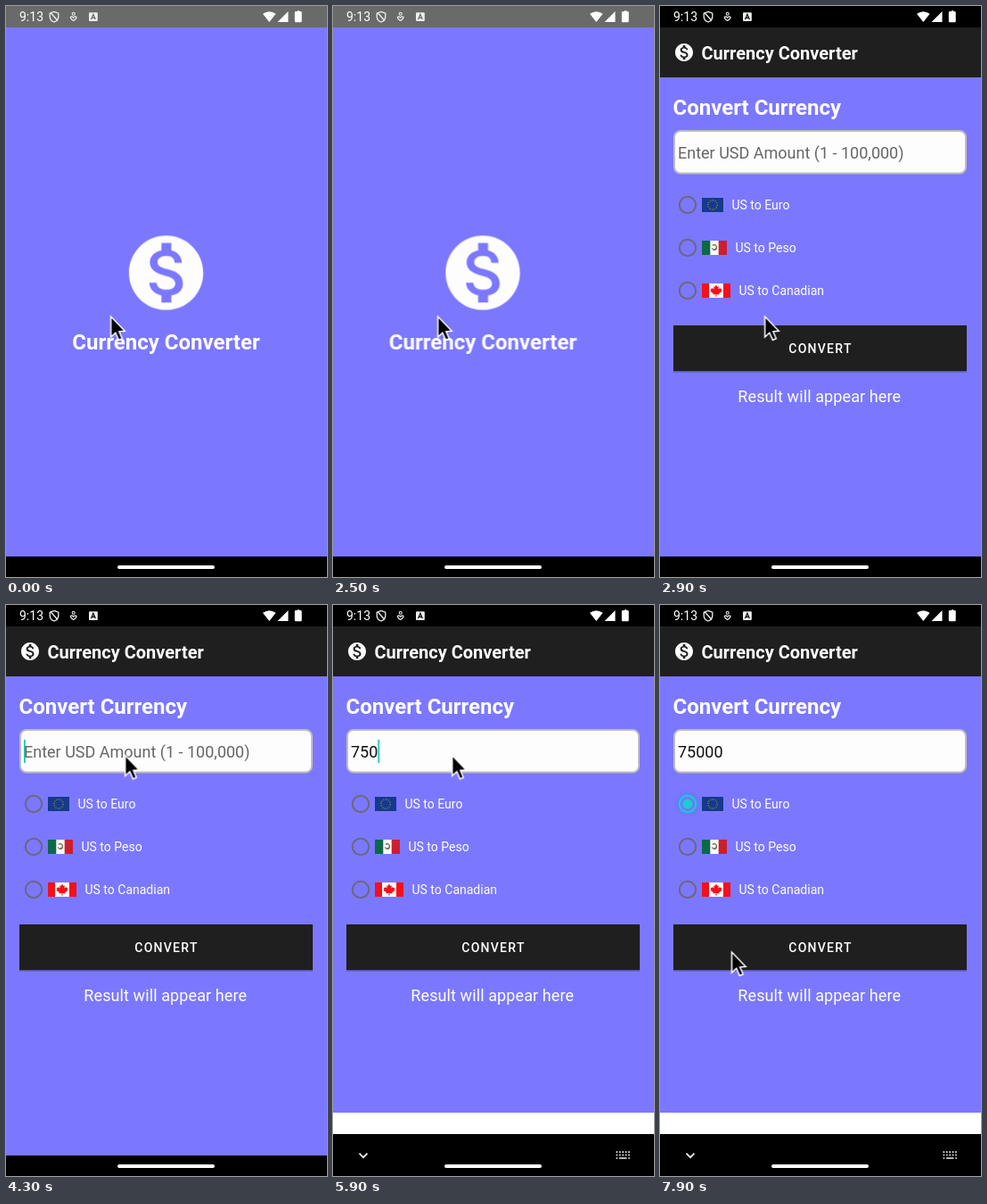
An HTML page for the animation above (8000 ms loop, 360x640 px).

```html
<!DOCTYPE html>
<html lang="en">
<head>
<meta charset="utf-8">
<title>Currency Converter</title>
<style>
html, body { margin: 0; width: 100%; height: 100%; overflow: hidden; background: #000; }
svg { display: block; width: 360px; height: 640px; }
text { font-family: Roboto, Arial, sans-serif; fill: #fff; }
.bold { font-weight: 700; }
.label { font-size: 14px; }
.field { font-size: 18px; }
.bg { fill: #7b78ff; }
.dark { fill: #1f1f1f; }
.ring { fill: none; stroke: #69697a; stroke-width: 2; }
.teal { fill: none; stroke: #1ccbd4; stroke-width: 2; }

/* Every part shares one clock; the picture is updated in 100 ms steps. */
.a { animation: 8s step-end -20ms infinite; }
#splash { animation-name: splash; }
#splashBody { animation-name: splashBody; }
#main { animation-name: main; }
#ime { animation-name: ime; }
#imeBar { animation-name: imeBar; }
#hint { animation-name: hint; }
#typing { animation-name: typing; }
#caret { animation-name: caret; }
#idle { animation-name: idle; }
#pressed { animation-name: pressed; }
#checked { animation-name: checked; }
#pointer { animation-name: pointer; }

@keyframes splash { 0% { opacity: 1 } 32.5%, 100% { opacity: 0 } }
@keyframes splashBody { 0% { transform: none } 31.25%, 100% { transform: translateX(-11.5px) } }
@keyframes main {
  0% { opacity: 0; transform: translateX(12px) }
  32.5% { opacity: 1; transform: translateX(3px) }
  33.75% { opacity: 1; transform: translateX(1px) }
  35%, 100% { opacity: 1; transform: none }
}
@keyframes ime { 0% { opacity: 0 } 55%, 100% { opacity: 1 } }
@keyframes imeBar {
  0% { transform: translateY(47px) }
  56.25% { transform: translateY(15px) }
  57.5% { transform: translateY(4px) }
  58.75%, 100% { transform: none }
}
@keyframes hint { 0% { opacity: 1 } 66.25%, 100% { opacity: 0 } }
@keyframes typing {
  0% { transform: none }
  66.25% { transform: translateX(10.1px) }
  68.75% { transform: translateX(20.2px) }
  73.75% { transform: translateX(30.3px) }
  76.25% { transform: translateX(40.4px) }
  77.5%, 100% { transform: translateX(50.5px) }
}
@keyframes caret {
  0%, 60%, 83.75%, 96.25%, 100% { opacity: 0 }
  53.75%, 66.25%, 90% { opacity: 1 }
}
@keyframes idle { 0% { opacity: 1 } 90%, 100% { opacity: 0 } }
@keyframes pressed { 0% { opacity: 0 } 90% { opacity: 1 } 91.25%, 100% { opacity: 0 } }
@keyframes checked { 0% { opacity: 0 } 91.25%, 100% { opacity: 1 } }
@keyframes pointer {
  0% { transform: translate(117.6px, 348px) }
  42.5% { transform: translate(118px, 343px) }
  43.75% { transform: translate(119px, 327px) }
  45% { transform: translate(122px, 298px) }
  46.25% { transform: translate(125px, 262px) }
  47.5% { transform: translate(128px, 228px) }
  48.75% { transform: translate(131px, 201px) }
  50% { transform: translate(132px, 183px) }
  51.25% { transform: translate(133px, 172px) }
  52.5% { transform: translate(133.6px, 168.5px) }
  82.5% { transform: translate(129px, 171px) }
  83.75% { transform: translate(115px, 179px) }
  85% { transform: translate(91px, 192px) }
  86.25% { transform: translate(67px, 205px) }
  87.5% { transform: translate(50px, 214px) }
  88.75% { transform: translate(41px, 219px) }
  90% { transform: translate(38.5px, 221px) }
  93.75% { transform: translate(42px, 234px) }
  95% { transform: translate(53px, 280px) }
  96.25% { transform: translate(68px, 339px) }
  97.5% { transform: translate(78px, 377px) }
  98.75%, 100% { transform: translate(80.5px, 389px) }
}
</style>
</head>
<body>
<svg viewBox="0 0 360 640">
  <defs>
    <path id="coin" fill="#fdfdfd" d="M12 2C6.48 2 2 6.48 2 12s4.48 10 10 10 10-4.48 10-10S17.52 2 12 2zm1.41 16.09V20h-2.67v-1.93c-1.71-.36-3.16-1.46-3.27-3.4h1.96c.1 1.05.82 1.87 2.65 1.87 1.96 0 2.4-.98 2.4-1.59 0-.83-.44-1.61-2.67-2.14-2.48-.6-4.18-1.62-4.18-3.67 0-1.72 1.39-2.84 3.11-3.21V4h2.67v1.95c1.86.45 2.79 1.86 2.85 3.39H14.3c-.05-1.11-.64-1.87-2.22-1.87-1.5 0-2.4.68-2.4 1.64 0 .84.65 1.39 2.67 1.91s4.18 1.39 4.18 3.91c-.02 1.83-1.38 2.83-3.12 3.16z"/>
    <g id="status">
      <text class="label" x="15" y="17">9:13</text>
      <g fill="none" stroke="#eee" stroke-width="1.3">
        <path d="M54 6.4l4.8 1.8v3.6c0 3-2 5.2-4.8 6.2-2.800-1-4.800-3.200-4.800-6.200V8.200zM50 7.500l8 9"/>
        <g stroke-width="1.100">
          <circle cx="75.700" cy="8.700" r="1.500"/>
          <path d="M72.300 12.200q1.900-1 3.400 .9 1.500-1.900 3.400-.9-.2 2.600-3.400 4.300-3.200-1.700-3.400-4.300z"/>
        </g>
      </g>
      <rect x="93" y="7.300" width="9.800" height="9.800" rx="1" fill="#eee"/>
      <path d="M95.500 15l2.400-5.700 2.400 5.700M96.400 13.300h3" fill="none" stroke="var(--bar)" stroke-width="1.200"/>
      <g fill="#fff">
        <path d="M295.300 18L288 8.700q7.300-5 14.600 0z"/>
        <path d="M316.500 6v12h-12z"/>
        <path d="M326 6h1V5h2v1h1.500q1.200 0 1.200 1.200v9.800q0 1.200-1.200 1.200H325q-1.200 0-1.200-1.200V7.200Q323.800 6 325 6z"/>
      </g>
    </g>
  </defs>

  <g id="main" class="a">
    <rect x="-40" width="440" height="24"/>
    <rect class="bg" x="-40" y="80" width="440" height="537"/>
    <rect class="dark" x="-40" y="24" width="440" height="56"/>
    <use href="#coin" x="15" y="40"/>
    <text class="bold" x="46.500" y="60" font-size="20">Currency Converter</text>
    <text class="bold" x="14.500" y="122" font-size="24">Convert Currency</text>

    <rect x="16" y="140" width="327" height="47.500" rx="7" fill="#fdfdfd" stroke="#bcbcc0" stroke-width="2"/>
    <text class="field" x="20" y="171" style="fill:#111">75000</text>
    <g id="typing" class="a">
      <rect x="20" y="148" width="60" height="32" fill="#fdfdfd"/>
      <rect id="caret" class="a" x="20" y="151" width="1.800" height="26" fill="#1cc8b4"/>
    </g>
    <text id="hint" class="a field" x="20" y="171" style="fill:#666">Enter USD Amount (1 - 100,000)</text>

    <g id="idle" class="a"><circle class="ring" cx="31" cy="223" r="9.200"/></g>
    <g id="pressed" class="a">
      <circle class="teal" cx="31" cy="223" r="9.200" style="stroke-width:1.700" stroke-dasharray="5 1.200"/>
    </g>
    <g id="checked" class="a">
      <circle cx="31" cy="223" r="15" fill="#4d80ee" opacity=".3"/>
      <circle class="teal" cx="31" cy="223" r="9.200"/>
      <circle cx="31" cy="223" r="5.500" fill="#1ccbd4"/>
    </g>
    <circle class="ring" cx="31" cy="271" r="9.200"/>
    <circle class="ring" cx="31" cy="319" r="9.200"/>

    <rect x="47" y="215" width="24" height="16" fill="#153a8c"/>
    <circle cx="59" cy="223" r="5.200" fill="none" stroke="#99984e" stroke-width="1.200" pathLength="12" stroke-dasharray=".4 .6"/>
    <text class="label" x="80.500" y="228">US to Euro</text>

    <rect x="47" y="263" width="28" height="16" fill="#fafafa"/>
    <rect x="47" y="263" width="9.300" height="16" fill="#0d6848"/>
    <rect x="65.700" y="263" width="9.300" height="16" fill="#cb1f30"/>
    <path d="M59 268.500q3-2.500 4.500 1.500-.3 3-3 3M58.300 271.500q2.500 4 5.400 0" fill="none" stroke="#77714c" stroke-width="1.400"/>
    <text class="label" x="84.500" y="276">US to Peso</text>

    <rect x="47" y="311" width="32" height="16" fill="#fafafa"/>
    <path d="M47 311h8v16h-8zM71 311h8v16h-8z" fill="#f5101c"/>
    <path d="M63 312.500l1.400 2.500 1.500-.7-.6 3.300 2-1.700.4 1.200 1.700-.2-.8 2 .9.800-3.300 2.500.3 1.200-3-.3v2.600h-1v-2.600l-3 .3.300-1.200-3.300-2.500.9-.8-.8-2 1.700.2.400-1.200 2 1.700-.6-3.300 1.500.7z" fill="#f5101c"/>
    <text class="label" x="88.500" y="324">US to Canadian</text>

    <rect x="15" y="360" width="329" height="50.500" fill="#34326f" opacity=".5"/>
    <rect class="dark" x="15" y="358" width="329" height="51"/>
    <text class="label" x="144.300" y="389" font-weight="500" letter-spacing="1.250">CONVERT</text>
    <text class="field" x="87.300" y="444" letter-spacing=".1">Result will appear here</text>

    <g id="ime" class="a">
      <rect y="569" width="360" height="48" fill="#fff"/>
      <g id="imeBar" class="a">
        <rect y="593" width="360" height="60"/>
        <path d="M29.500 614.700l4.500 4.500 4.500-4.500" fill="none" stroke="#eee" stroke-width="1.700"/>
        <g stroke="#eee" stroke-width="1.700">
          <path d="M317.500 613.200h15.500M317.500 616.500h15.500" stroke-dasharray="1.700 1.700"/>
          <path d="M317.500 620h1.700M321 620h8.500M331.200 620h1.700"/>
        </g>
      </g>
    </g>
    <use href="#status" style="--bar:#000"/>
  </g>

  <g id="splash" class="a">
    <rect class="bg" width="360" height="617"/>
    <rect width="360" height="24" fill="#6a6a6a"/>
    <g id="splashBody" class="a">
      <use href="#coin" transform="translate(129.500 249) scale(4.167)"/>
      <text class="bold" x="179.500" y="385" font-size="24" text-anchor="middle">Currency Converter</text>
    </g>
    <use href="#status" style="--bar:#6a6a6a"/>
  </g>

  <rect y="617" width="360" height="23" id="nav" fill-opacity="0"/>
  <rect x="125" y="627" width="109" height="4" rx="2" fill="#fff"/>

  <g id="pointer" class="a">
    <path d="M0 0V23L5.200 18.300 8.800 26.400 12.600 24.800 9.200 16.800 15.600 16.300Z" stroke="#fff" stroke-width="1.500"/>
  </g>
</svg>
</body>
</html>
```
